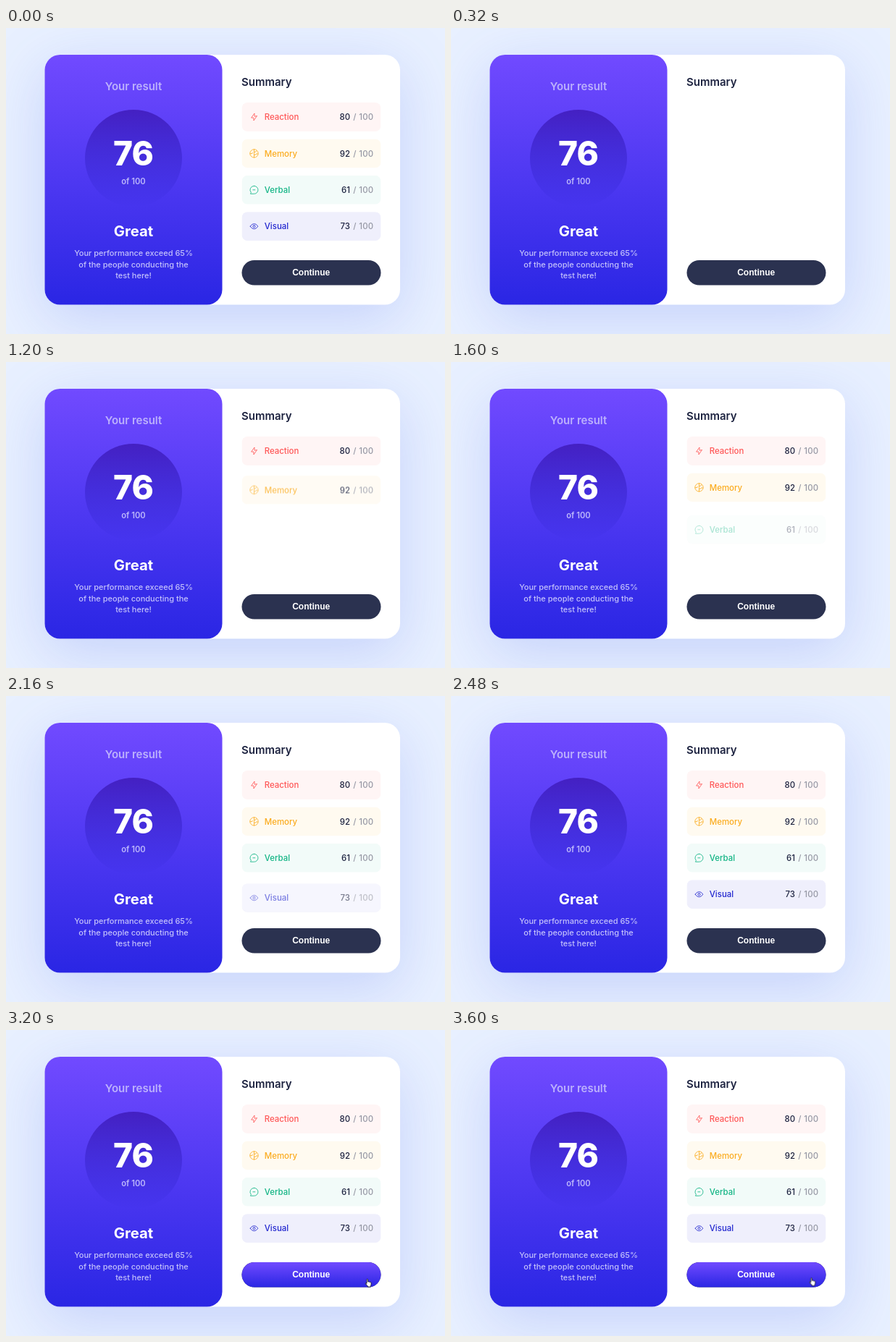
An HTML page that plays this animation: 606 px wide and 423 px high, repeating every 3.68 s.

```html
<!DOCTYPE html>
<html lang="en">
<head>
<meta charset="utf-8">
<title>Result summary</title>
<style>
  html, body { margin: 0; width: 100%; height: 100%; overflow: hidden; background: #e8f0ff; }
  svg { display: block; width: 606px; height: 423px; font-family: Inter, "Open Sans", sans-serif; }
  .card { fill: #fff; filter: drop-shadow(0 20px 40px rgba(61, 90, 236, .2)); }
  .mid { text-anchor: middle; }
  .head { font-size: 15px; font-weight: 600; }
  .score { font-size: 46px; font-weight: 800; letter-spacing: -1px; fill: #fff; }
  .of { font-size: 11.2px; font-weight: 600; fill: #bdb8fb; }
  .grade { font-size: 20.3px; font-weight: 700; fill: #fff; }
  .note { font-size: 11px; font-weight: 500; fill: #c3c1fb; }
  .row { font-size: 11.4px; font-weight: 500; }
  .row .end { text-anchor: end; }
  .icon { fill: none; stroke-width: 1.25; stroke-linejoin: round; stroke-linecap: round; }
  .cta { font: bold 12px "Liberation Sans", Arial, sans-serif; fill: #fff; }
</style>
</head>
<body>
<svg viewBox="0 0 606 423">
  <defs>
    <linearGradient id="violet" x2="0" y2="1">
      <stop stop-color="#714aff"/><stop offset="1" stop-color="#2a26e4"/>
    </linearGradient>
    <linearGradient id="disc" x2="0" y2="1">
      <stop stop-color="#4420c2"/><stop offset="1" stop-color="#2521c9" stop-opacity="0"/>
    </linearGradient>
  </defs>

  <rect class="card" x="53.5" y="37" width="490.5" height="345.5" rx="21"/>
  <rect x="53.5" y="37" width="245" height="345.5" rx="21" fill="url(#violet)"/>
  <circle cx="176" cy="180" r="67" fill="url(#disc)"/>
  <g class="mid">
    <text class="head" x="176" y="85.5" fill="#bcb1fc">Your result</text>
    <text class="score" x="175.5" y="189.5">76</text>
    <text class="of" x="176" y="216">of 100</text>
    <text class="grade" x="176" y="287.5">Great</text>
    <g class="note">
      <text x="176" y="315">Your performance exceed 65%</text>
      <text x="176" y="331">of the people conducting the</text>
      <text x="176" y="346">test here!</text>
    </g>
  </g>

  <text class="head" x="325" y="79.5" fill="#1d2340">Summary</text>
  <g id="rows"></g>

  <rect x="325.5" y="321" width="192" height="34.5" rx="17.25" fill="#2b3250"/>
  <rect id="hover" x="325.5" y="321" width="192" height="34.5" rx="17.25" fill="url(#violet)"/>
  <text class="cta mid" x="421.2" y="342.3">Continue</text>

  <g id="cursor">
    <path id="arrow" fill="#000" stroke="#fff" stroke-width=".6"
      d="M0 0V8.5L2 6.7 3.3 9.6 4.7 9 3.4 6.1H6Z"/>
    <path id="hand" fill="#fff" stroke="#111" stroke-width=".8" stroke-linejoin="round" transform="translate(-2.8 0)"
      d="M2 6.5V1.2Q2 .2 2.8 .2T3.6 1.2V4Q4.4 3.5 5.2 4.2Q6 3.8 6.6 4.5Q7.6 4.2 8 5.2V7.5Q8 8.5 7.3 9.5V11H3.4V10Q1.6 8.4 .3 6.3Q.4 5.2 1.2 5.8Z"/>
  </g>
</svg>

<script>
const LOOP = 3680;
const RESET = 80, FIRST = 485, STAGGER = 500, RISE = 500, DROP = 12.5;
const ENTER = 2560, HOVER = 3040;

const ROWS = [
  ["Reaction", 80, "#ff5757", .06, "M10.8 8.3V2.5L4.2 11.7h5V17.5l6.6-9.2z"],
  ["Memory", 92, "#fbac20", .065,
    "M10 1.5a8.5 8.5 0 1 0 0 17a8.5 8.5 0 1 0 0-17V18.5M1.8 10.5h3q2 0 2-2M10 7h2.5q2 0 2-2M10 13h2q2 0 2-2h4"],
  ["Verbal", 61, "#12b585", .05, "M10 1.8a8.2 8.2 0 1 1 0 16.4H2.5l1.3-2.8A8.2 8.2 0 0 1 10 1.8M7.5 10h4.5"],
  ["Visual", 73, "#2227cf", .07,
    "M2 10q3.2-5.4 8-5.4t8 5.4q-3.2 5.4-8 5.4t-8-5.4M10 7.6a2.4 2.4 0 1 0 0 4.8a2.4 2.4 0 1 0 0-4.8"]
];

const $ = id => document.getElementById(id);

// Each step is [time in ms, styles, easing to the next step].
function play(el, steps) {
  const frames = steps.map(([ms, style, easing = "linear"]) => ({ ...style, offset: ms / LOOP, easing }));
  el.animate(frames, { duration: LOOP, iterations: Infinity });
}

// Visible only from one time to another, with hard cuts.
function showBetween(el, from, to) {
  const off = { opacity: 0 }, on = { opacity: 1 };
  play(el, [[0, off], [from, off], [from, on], [to, on], [to, off], [LOOP, off]]);
}

$("rows").innerHTML = ROWS.map(([name, score, color, tint, icon], i) => `
  <g transform="translate(325.5 ${103 + i * 50.4})"><g class="row">
    <rect width="192" height="40" rx="8" fill="${color}" fill-opacity="${tint}"/>
    <path class="icon" transform="translate(10.3 13.3) scale(.667)" stroke="${color}" d="${icon}"/>
    <text x="31.3" y="24.2" fill="${color}">${name}</text>
    <text class="end" x="149.5" y="24.2" fill="#1d2340">${score}</text>
    <text class="end" x="182" y="24.2" fill="#9698a5" letter-spacing=".3">/ 100</text>
  </g></g>`).join("");

document.querySelectorAll(".row").forEach((row, i) => {
  const start = FIRST + i * STAGGER;
  const shown = { opacity: 1, transform: "translateY(0px)" };
  const hidden = { opacity: 0, transform: `translateY(${DROP}px)` };
  play(row, [
    [0, shown], [RESET, shown], [RESET, hidden],
    [start, hidden, "ease"], [start + RISE, shown], [LOOP, shown]
  ]);
});

const at = (x, y) => ({ transform: `translate(${x}px, ${y}px)` });
play($("cursor"), [
  [0, at(539, 424)], [ENTER, at(539, 424)], [2800, at(528, 382)],
  [HOVER, at(506, 353), "ease-out"], [3280, at(497.5, 342.5)], [LOOP, at(497.5, 342.5)]
]);
showBetween($("arrow"), ENTER, HOVER);
showBetween($("hand"), HOVER, LOOP);
showBetween($("hover"), HOVER, LOOP);
</script>
</body>
</html>
```
